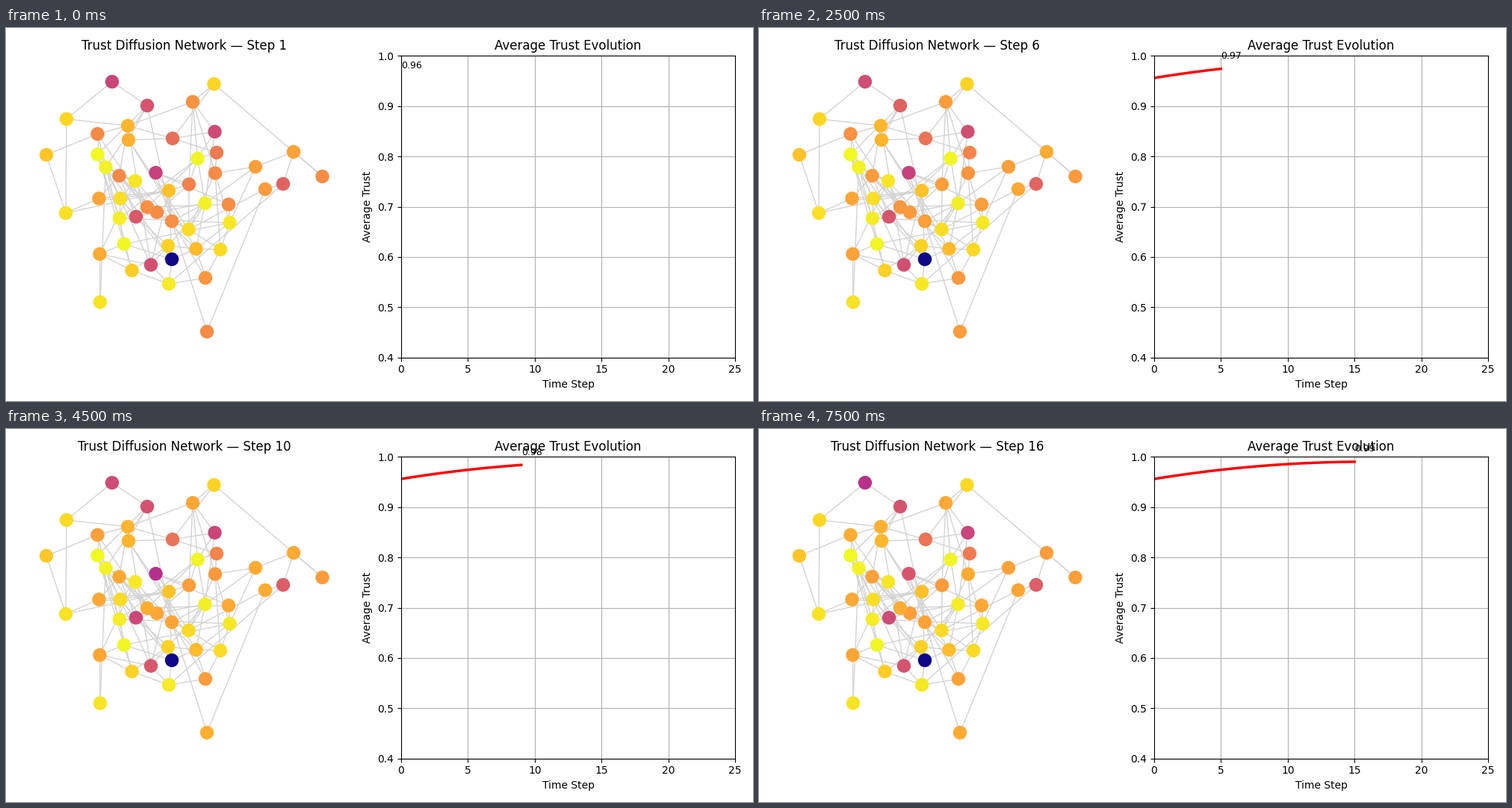
Recreate the animation shown at these times as a matplotlib script. Size 1000 by 500 pixels, loop 8 s.

```python
import matplotlib.pyplot as plt
import numpy as np
from matplotlib.animation import FuncAnimation
from matplotlib.collections import LineCollection

W, H, DPI = 1000, 500, 100
STEPS = 16
rng = np.random.default_rng(4)

# Node centres in stage pixels (y down), from least to most trusting
NODES = np.array([
    (222, 310), (200.5, 194), (142, 72), (279.5, 139), (194, 317.5),
    (189, 104), (174, 253), (371, 209), (223, 148), (282, 167),
    (245, 209.5), (122.5, 142), (151.5, 198), (280, 194.5), (269, 407),
    (202, 247), (423.5, 199), (298, 236.5), (222, 259), (189, 240),
    (250, 99), (267, 335), (347, 216), (334, 186), (385, 166),
    (124.5, 228.5), (125.5, 303), (164, 150), (163, 131), (254.5, 296),
    (218, 218), (54, 170), (168.5, 325), (217, 292), (278.5, 75),
    (81, 122), (287, 297), (244.5, 270), (153, 228.5), (80, 248),
    (126, 367.5), (173, 205), (299.5, 261), (218, 343), (152, 255),
    (266.5, 235), (133.5, 186.5), (256.5, 175), (158, 289.5),
    (122.5, 169.5),
])
N = len(NODES)


def make_links():
    """Tie every node to two or three others that lie further inward."""
    radius = np.hypot(*(NODES - NODES.mean(axis=0)).T)
    links = set()
    for i, r in enumerate(radius):
        dist = np.hypot(*(NODES - NODES[i]).T)
        weight = np.exp(-dist / (70 - 0.2 * r)) * (radius < r + 40)
        weight[i] = 0
        count = 3 if r < 130 else 2
        for j in rng.choice(N, count, replace=False, p=weight / weight.sum()):
            links.add((min(i, j), max(i, j)))
    return [NODES[list(link)] for link in sorted(links)]


def make_levels():
    """Colour level of each node per step: rank curve, slow rise, jitter."""
    start = np.interp(range(N), [1, 6, 9, 11, 19, 26, 33, N - 1],
                      [.48, .56, .67, .715, .735, .81, .91, 1])
    rise = 0.08 * np.exp(-((start - 0.71) / 0.05) ** 2)
    jitter = np.zeros(N)
    rows = []
    for k in range(STEPS):
        row = start + rise * min(1, k / 8) + jitter
        row[0] = 0
        rows.append(row.clip(0, 1))
        jitter = 0.8 * jitter + 0.04 * (1 - start) * rng.standard_normal(N)
    return rows


links = make_links()
levels = make_levels()
steps = np.arange(STEPS)
average = 0.956 + 0.00432 * steps - 0.000136 * steps ** 2

fig, (net, chart) = plt.subplots(1, 2, figsize=(W / DPI, H / DPI), dpi=DPI,
                                 facecolor="white")
net.axis("off")
title = net.set_title("Trust Diffusion Network — Step 1")
chart.set(xlim=(0, 25), ylim=(0.4, 1.0), xlabel="Time Step",
          ylabel="Average Trust", title="Average Trust Evolution")
chart.grid(True)
fig.tight_layout()

# The network axes count in stage pixels
box = net.bbox
net.set(xlim=(box.x0, box.x1), ylim=(H - box.y0, H - box.y1))
net.add_collection(LineCollection(links, colors="lightgray", linewidths=1,
                                  zorder=1), autolim=False)
dots = net.scatter(*NODES.T, s=150, c=levels[0], cmap="plasma", vmin=0, vmax=1,
                   linewidths=1, edgecolors="face", zorder=2)
curve, = chart.plot([], [], color="red", linewidth=2.5)
label = chart.text(0, 0, "", fontsize=9)


def draw(k):
    dots.set_array(levels[k])
    title.set_text(f"Trust Diffusion Network — Step {k + 1}")
    curve.set_data(steps[:k + 1], average[:k + 1])
    label.set_position((k, average[k] + 0.02))
    label.set_text(f"{average[k]:.2f}")
    return dots, title, curve, label


anim = FuncAnimation(fig, draw, frames=STEPS, interval=500, repeat=True,
                     repeat_delay=0, blit=False)
plt.show()
```
